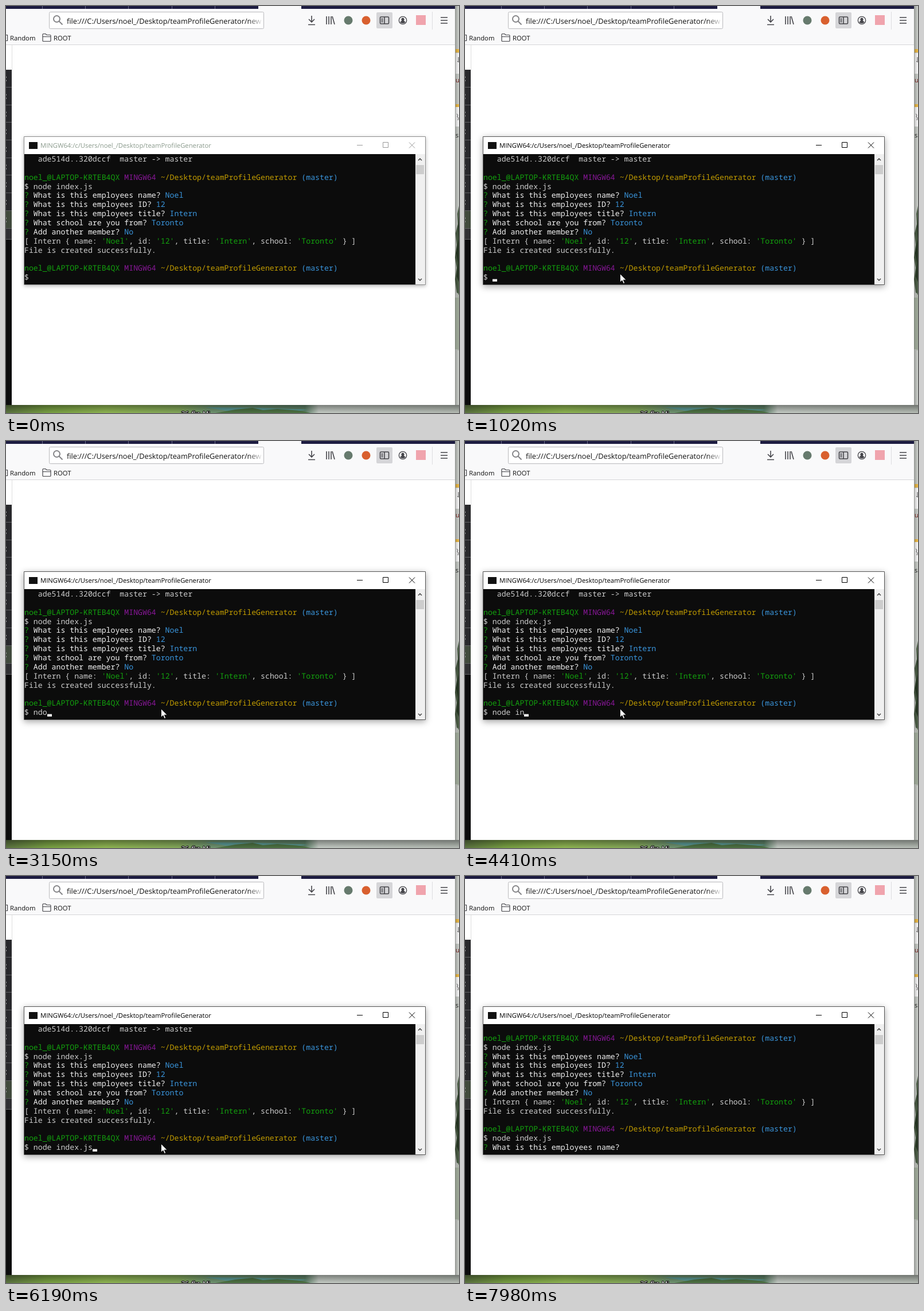
Recreate the animation shown at these times as an HTML page. Size 790 by 709 pixels, loop 8000 ms.

```html
<!DOCTYPE html>
<html lang="en">
<head>
<meta charset="utf-8">
<title>Terminal session</title>
<style>
  html, body { margin: 0; width: 100%; height: 100%; overflow: hidden; background: #fff; }
  svg { display: block; width: 790px; height: 709px; }
  text { font-family: "Open Sans", "Noto Sans", sans-serif; text-rendering: geometricPrecision; white-space: pre; }
  .mono text { font: 13.216px "Noto Sans Mono", "DejaVu Sans Mono", monospace; }
  .icon { fill: none; stroke: #45454a; stroke-width: 1.6; }
  .frame { fill: #fff; stroke: #8d8d8d; filter: drop-shadow(0 2px 3px rgba(0,0,0,.28)); }
  .caption { fill: #8a9a8c; font-size: 11.25px; }
  .controls { fill: none; stroke: #999; }
  .active .frame { stroke: #555; filter: drop-shadow(0 3px 6px rgba(0,0,0,.36)); }
  .active .caption { fill: #000; }
  .active .controls { stroke: #000; }
</style>
</head>
<body>
<svg viewBox="0 0 790 709">
  <defs>
    <linearGradient id="meadow">
      <stop offset="0" stop-color="#5c7440"/>
      <stop offset=".09" stop-color="#78a043"/>
      <stop offset=".22" stop-color="#8fb552"/>
      <stop offset=".38" stop-color="#84a85a"/>
      <stop offset=".45" stop-color="#6f9470"/>
      <stop offset=".66" stop-color="#5d8268"/>
      <stop offset=".69" stop-color="#c3cac3"/>
      <stop offset="1" stop-color="#b5bcb4"/>
    </linearGradient>
    <linearGradient id="shadeDown" x2="0" y2="1">
      <stop stop-opacity=".38"/><stop offset="1" stop-opacity="0"/>
    </linearGradient>
    <linearGradient id="shadeRight">
      <stop stop-opacity=".28"/><stop offset="1" stop-opacity="0"/>
    </linearGradient>
    <linearGradient id="fade">
      <stop stop-color="#fff" stop-opacity="0"/><stop offset="1" stop-color="#fff"/>
    </linearGradient>
    <clipPath id="screen"><path d="M32 258H714V485H32Z"/></clipPath>
    <clipPath id="address"><path d="M76 11H447V39H76Z"/></clipPath>
  </defs>

  <!-- desktop -->
  <path fill="#cfd3ce" d="M783 0h7v709h-7z"/>
  <path fill="#fff" d="M784 82h6v36h-6zM784 176h6v34h-6z"/>
  <path fill="#f3c04b" d="M784 75h6v6h-6zM784 171h6v5h-6z"/>
  <path fill="none" stroke="#555" d="M789 89v9m-2-2 2 2M786 188q3 1 1 5q3 1 1 6"/>
  <text x="784" y="133" font-size="11" fill="#7b1b18">u</text>
  <text x="784" y="229" font-size="11" fill="#222">s</text>
  <path fill="#4e6048" d="M790 348l-3 14 1 18-4 16 2 20-3 22 3 18-3 20 3 23 4 4z"/>
  <path fill="#263623" d="M790 366l-2 18 1 22-4 24 3 18-2 23 4 10z"/>
  <path fill="#b2bdac" d="M783 508h7v90h-7z"/>
  <path stroke="#929d8b" d="M788.5 500v100"/>
  <path fill="url(#shadeRight)" d="M783 0h7v709h-7z"/>
  <path fill="url(#meadow)" d="M0 695h790v14H0z"/>
  <path fill="#5b9a96" d="M348 699l92 1 86 3-20 3H390z"/>
  <path fill="#4c7142" d="M365 709l35-6 30-3 18 4 25-2 40 3 18 4z"/>
  <path fill="url(#shadeDown)" d="M0 695h790v14H0z"/>
  <text x="306" y="714" font-size="11" fill="#fff" stroke="#111" stroke-width="2" paint-order="stroke">36_fks_Mi</text>

  <!-- browser -->
  <path fill="#fff" d="M0 0h783v695H0z"/>
  <path fill="#f9f9fa" d="M0 0h783v67H0z"/>
  <path fill="#1d1c41" d="M0 0h440v5H0zM515 0h268v5H515z"/>
  <path stroke="#6b6b88" d="M63.5 0v5m75-5v5m75-5v5m76-5v5m75-5v5"/>
  <path stroke="#d6d6d8" d="M0 67.5h783"/>
  <rect x="75.500" y="10.500" width="374" height="29" rx="2" fill="#fff" stroke="#b9b9bc"/>
  <g fill="none" stroke="#858588" stroke-width="2"><circle cx="88.500" cy="22.500" r="5.500"/><path d="M92.500 26.500l6 6"/></g>
  <g clip-path="url(#address)">
    <text x="106" y="30.500" font-size="12.75" fill="#111">file:///C:/Users/noel_/Desktop/teamProfileGenerator/new</text>
    <path fill="url(#fade)" d="M422 12h26v26h-26z"/>
  </g>
  <g font-size="11.3" fill="#111"><text x="7" y="59.500">Random</text><text x="83" y="59.500">ROOT</text></g>
  <path class="icon" style="stroke-width:1.2" d="M64 60.500v-11q0-1 1-1h4l2 2h6q1 0 1 1v9q0 1-1 1H65q-1 0-1-1zM64 53.500h14M0 50.500h2.500v10H0"/>
  <path class="icon" d="M533 17v11m-5-5 5 5 5-5M527 32.500h12M559 18v14M563 18v14M567 18v14M569 18l4 14M758 20h12m-12 5h12m-12 5h12"/>
  <circle cx="597" cy="25" r="7.500" fill="#667a6d"/>
  <circle cx="628" cy="25" r="7.500" fill="#d9602f"/>
  <rect x="646" y="11" width="28" height="28" rx="2" fill="#d5d5d8"/>
  <path class="icon" d="M654 19h12q1.500 0 1.500 1.500v9q0 1.500-1.500 1.500h-12q-1.500 0-1.500-1.500v-9q0-1.500 1.500-1.500zM660 19v12M654.500 22.500h3m-3 2.500h3m-3 2.500h3"/>
  <circle class="icon" cx="692" cy="25" r="6.700" style="stroke-width:1.300"/>
  <path fill="#45454a" d="M692 20.500a3 3 0 0 1 1.700 5.200q2.300.8 2.800 2.800q-4.500 3.500-9 0q.5-2 2.800-2.800a3 3 0 0 1 1.700-5.200z"/>
  <path fill="#f0a4ad" d="M715 16h17v17h-17z"/>
  <path stroke="#dedee0" d="M743.500 10v31"/>

  <!-- sidebar edge -->
  <path stroke="#ddd" d="M10.500 68v43"/>
  <path fill="#0c0c0d" d="M0 111h10v584H0z"/>
  <path fill="#29292c" d="M0 111h10v246H0z"/>
  <path fill="#414b3d" d="M0 357h10v31H0z"/>
  <path fill="#303033" d="M0 388h10v19H0z"/>
  <path stroke="#626265" d="M0 141.500h10m-10 31h10m-10 30h10m-10 31h10m-10 31h10m-10 30h10m-10 31h10m-10 31h10m-10 31h10m-10 19h10"/>
  <path stroke="#a4a4a7" stroke-dasharray="2 4 2 22.700" d="M.500 123v255"/>

  <!-- terminal window -->
  <g id="win">
    <path class="frame" d="M31.500 227.500h700v258h-700z"/>
    <path fill="#111" d="M40 237h15v12H40z"/>
    <text class="caption" x="60" y="247">MINGW64:/c/Users/noel_/Desktop/teamProfileGenerator</text>
    <path class="controls" d="M612 242.500h10M657.500 237.500h9v9h-9zM703 237.500l10 10m0-10-10 10"/>
    <path fill="#0c0c0c" d="M32 258h682v227H32z"/>
    <path fill="#f0f0f0" d="M714 258h17v227h-17z"/>
    <path fill="#cdcdcd" d="M715 277h14v16h-14z"/>
    <path fill="none" stroke="#505050" stroke-width="1.700" d="M719 269l3-3 3 3M719 475l3 3 3-3"/>
    <g class="mono" clip-path="url(#screen)">
      <g id="log"></g>
      <path id="caret" fill="#f2f2f2" d="M0 475.700h8v4.300H0z"/>
    </g>
  </g>
  <path id="pointer" fill="#fff" stroke="#000" stroke-width=".8" d="M.500.500V15.300L3.900 12 6.300 17.500 8.600 16.500 6.200 11.200H11Z"/>
</svg>

<script>
const LOOP = 8000, CELL = 7.93, ROW = 15.85, LEFT = 32, BASE = 271;
const GREY = '#ccc', WHITE = '#f2f2f2', GREEN = '#13a10e', BLUE = '#3a96dd', PURPLE = '#881798', GOLD = '#c19c00';
const byId = id => document.getElementById(id);
const win = byId('win'), log = byId('log'), caret = byId('caret'), pointer = byId('pointer');

const prompt = [[GREEN, 'noel_@LAPTOP-KRTEB4QX '], [PURPLE, 'MINGW64 '], [GOLD, '~/Desktop/teamProfileGenerator '], [BLUE, '(master)']];
const plain = text => [[GREY, text]];
const ask = (question, answer = '') => [[GREEN, '? '], [WHITE, question + ' '], [BLUE, answer]];
const quoted = text => text.split(/('[^']*')/).map(part => [part[0] === "'" ? GREEN : GREY, part]);

const lines = [
  plain('   ade514d..320dccf  master -> master'),
  [],
  prompt,
  plain('$ node index.js'),
  ask('What is this employees name?', 'Noel'),
  ask('What is this employees ID?', '12'),
  ask('What is this employees title?', 'Intern'),
  ask('What school are you from?', 'Toronto'),
  ask('Add another member?', 'No'),
  quoted("[ Intern { name: 'Noel', id: '12', title: 'Intern', school: 'Toronto' } ]"),
  plain('File is created successfully.'),
  [],
  prompt,
  plain('$ '),
  ask('What is this employees name?')
];

function svg(tag, parent, attrs) {
  const node = document.createElementNS('http://www.w3.org/2000/svg', tag);
  for (const key in attrs) node.setAttribute(key, attrs[key]);
  return parent.appendChild(node);
}

const rows = lines.map((runs, i) => {
  const row = svg('text', log, { x: LEFT, y: BASE + i * ROW });
  for (const [fill, text] of runs) svg('tspan', row, { fill }).textContent = text;
  return row;
});
const command = rows[13].firstChild, question = rows[14];

// "<" is backspace
const keys = 'ndoe <<<<ode index.js';
const keyTimes = [2210, 2360, 2460, 2570, 2670, 2980, 3110, 3240, 3370, 3550, 3700, 3850, 4010,
  4160, 4410, 4490, 4600, 4720, 5090, 5230, 5370];
const caretOn = [[950, 1420], [1960, 5650], [6190, 6650], [7210, 7750]];
const ACTIVATE = 950, ENTER = 6340, ASK = 6650;

function typedAt(t) {
  let text = '';
  keyTimes.forEach((time, i) => {
    if (t >= time) text = keys[i] === '<' ? text.slice(0, -1) : text + keys[i];
  });
  return text;
}

function pointerAt(t) {
  if (t < 70 || t >= 7980) return null;
  if (t >= 7910) return [363, 546];
  if (t >= 1020) return [270, 466];
  const step = Math.min(1, Math.floor((t - 70) / 80) / 9);
  const rest = (1 - step) ** 2;
  return [269 + 80 * rest, 467 + 82 * rest];
}

function draw(t) {
  const text = typedAt(t);
  win.classList.toggle('active', t >= ACTIVATE);
  command.textContent = '$ ' + text;
  log.setAttribute('transform', `translate(0 ${t >= ENTER ? -ROW : 0})`);
  question.style.display = t >= ASK ? '' : 'none';

  const column = t >= ASK ? 31 : t >= ENTER ? 0 : 2 + text.length;
  caret.setAttribute('transform', `translate(${Math.round(LEFT + column * CELL)} 0)`);
  caret.style.display = caretOn.some(([from, to]) => t >= from && t < to) ? '' : 'none';

  const tip = pointerAt(t);
  pointer.style.display = tip ? '' : 'none';
  if (tip) pointer.setAttribute('transform', `translate(${tip.map(Math.round)})`);
}

const start = performance.now();
function tick() {
  draw((performance.now() - start) % LOOP);
  requestAnimationFrame(tick);
}
tick();
</script>
</body>
</html>
```
